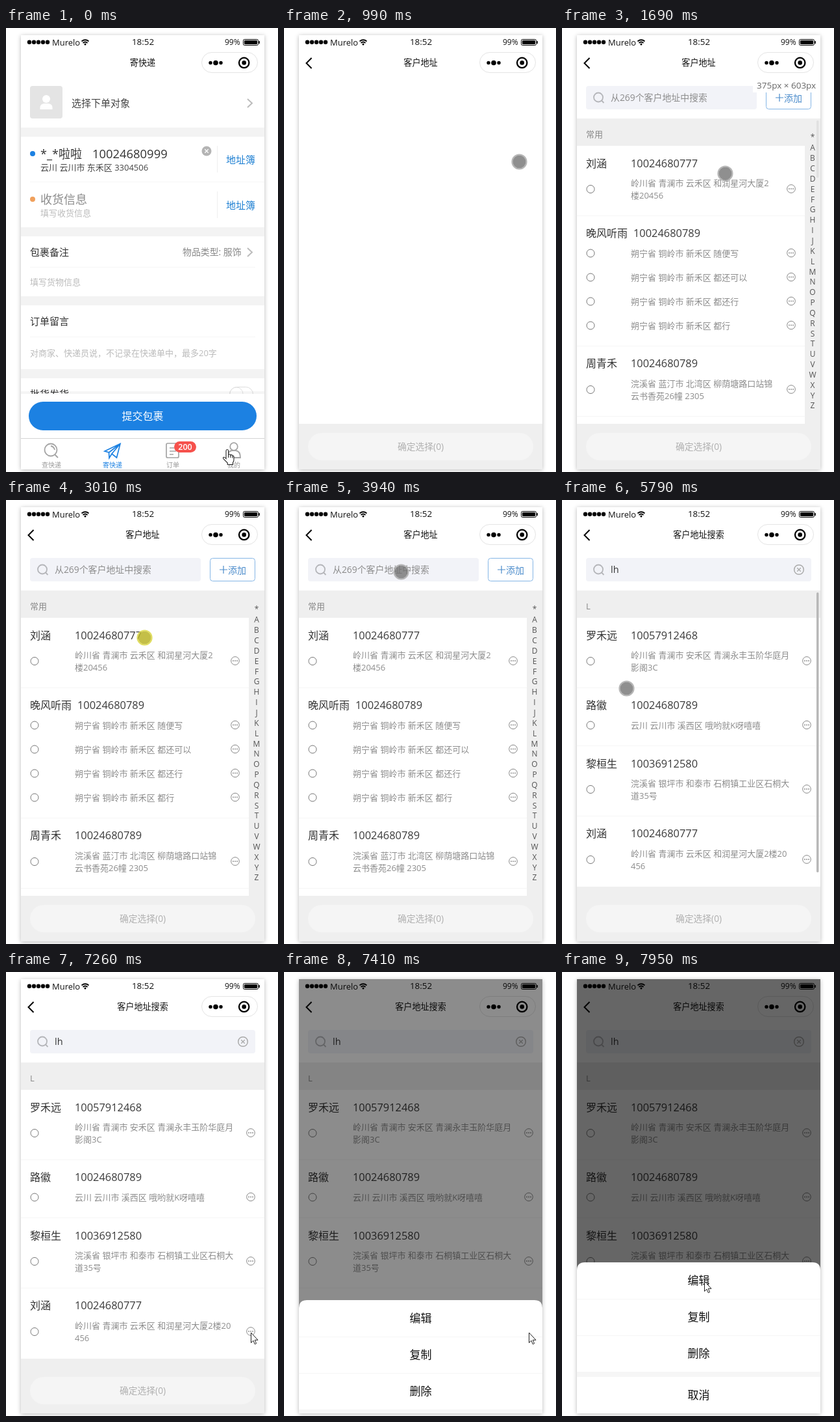
Recreate the animation shown at these times as an HTML page. Size 419 px wide and 682 px high, loop 8000 ms.

```html
<!DOCTYPE html>
<html lang="zh-CN">
<head>
<meta charset="utf-8">
<title>寄快递</title>
<style>
html, body { margin: 0; width: 100%; height: 100%; overflow: hidden; background: #fff; }
svg { display: block; width: 419px; height: 682px; }
text { font-family: "Open Sans", "Noto Sans CJK SC", "Noto Sans CJK", sans-serif; }
#phone { filter: drop-shadow(0 1px 3px rgba(0, 0, 0, .28)); }
</style>
</head>
<body>
<svg id="stage" viewBox="0 0 419 682" xmlns="http://www.w3.org/2000/svg"></svg>
<script>
const FPS = 13, LOOP = 8000;
const BLUE = '#1c81e2', GREY = '#999', PALE = '#bbb', INK = '#333';

// ---- drawing helpers ----
const text = (x, cy, size, fill, str, anchor = 'start', extra = '') =>
  `<text x="${x}" y="${(cy + size * .37).toFixed(2)}" font-size="${size}" fill="${fill}" text-anchor="${anchor}" ${extra}>${str}</text>`;
const mid = (cy, size, fill, str) => text(210.5, cy, size, fill, str, 'middle');
const rect = (x, y, w, h, fill, rx = 0, extra = '') =>
  `<rect x="${x}" y="${y}" width="${w}" height="${h}" rx="${rx}" fill="${fill}" ${extra}/>`;
const circle = (cx, cy, r, fill, extra = '') =>
  `<circle cx="${cx}" cy="${cy}" r="${r}" fill="${fill}" ${extra}/>`;
const line = (d, color, w = 1) =>
  `<path d="${d}" fill="none" stroke="${color}" stroke-width="${w}"/>`;
const group = (id, body) => `<g id="${id}">${body}</g>`;
const rule = (y, x1 = 37, x2 = 384) => rect(x1, y, x2 - x1, 1, '#f6f6f6');
const chevron = cy => line(`M372 ${cy - 6}l7 6.500l-7 6.500`, '#bcbcbc', 2);

// ---- shared parts ----
function statusBar() {
  const dots = [36, 43, 50, 57, 64].map(x => circle(x, 21.7, 3.2, '#000')).join('');
  const wifi = line('M116.500 20.500Q122 16 127.500 20.500M118.500 23Q122 20 125.500 23', '#000', 1.7) + circle(122, 25, 1.5, '#000');
  const battery = rect(365.5, 17.5, 23, 9, 'none', 2, 'stroke="#000"') + rect(367, 19, 20, 6, '#000', 1) + rect(389.5, 20, 1.5, 4, '#000');
  return dots + text(71, 22, 13, '#111', 'Murelo') + wifi +
    text(211, 21, 13.4, '#111', '18:52', 'middle') + text(337, 22, 12, '#111', '99%') + battery;
}

const capsule = rect(301.5, 37.5, 86, 31, '#fff', 15.5, 'stroke="#e4e4e4"') +
  circle(315, 53.5, 2.7, '#000') + circle(323, 53.5, 3.8, '#000') + circle(331, 53.5, 2.7, '#000') +
  circle(366.7, 53.4, 7.7, 'none', 'stroke="#000" stroke-width="2.3"') + circle(366.7, 53.4, 3.3, '#000');

const lens = circle(56, 106.5, 7, 'none', 'stroke="#b4b5b9" stroke-width="1.8"') + line('M61 111.500l3.500 3.500', '#b4b5b9', 1.8);
const cross = (x, y, r, color) => line(`M${x - r} ${y - r}l${2 * r} ${2 * r}m0 ${-2 * r}l${-2 * r} ${2 * r}`, color, 1.3);

function confirmBar(y, label) {
  return rect(23, y, 375, 678 - y, '#efefef') + rect(37, 622, 347, 42, '#f5f5f5', 21) + (label || '');
}
const confirmText = mid(643, 13.8, '#b0b0b0', '确定选择(0)');

const radio = y => circle(44, y, 6, '#fff', 'stroke="#777" stroke-width="1"');
const more = (x, y) => circle(x, y, 6.3, '#fff', 'stroke="#888" stroke-width="1"') +
  [-3, 0, 3].map(d => circle(x + d, y, .9, '#888')).join('');
const person = (y, name, phone, x = 106) => text(37, y, 16, INK, name) + text(x, y, 16.4, '#3a3a3a', phone);
const address = (y, moreX, ...lines) => {
  const c = y + (lines.length - 1) * 9.5;
  return lines.map((s, i) => text(106, y + i * 19, 13, '#8c8c8c', s)).join('') + radio(c) + more(moreX, c - .5);
};

// ---- pages ----
function homePage() {
  const bands = [153, 306, 412, 524].map(y => rect(23, y, 375, 14, '#f3f3f3')).join('');
  const avatar = rect(37, 89, 50, 50, '#e4e4e4', 4) + circle(62, 109, 6, '#fff') +
    '<path d="M52.500 125v-3q0-5 6-6h7q6 1 6 6v3z" fill="#fff"/>';
  const book = cy => rect(325, cy - 21, 1, 41, '#efefef') + text(339, cy, 15, '#1d7fd2', '地址簿');
  const sender = circle(41, 193, 4, BLUE) + text(53, 193, 18, INK, '*_*啦啦') + text(133, 193, 18.4, INK, '10024680999') +
    text(53, 214, 13, '#444', '云川 云川市 东禾区 3304506') +
    circle(309, 189, 7.5, '#b4b4b4') + cross(309, 189, 2.7, '#fff') + book(202);
  const receiver = circle(41, 263, 4, '#f0a05c') + text(53, 263, 18, '#8c8c8c', '收货信息') +
    text(53, 284, 13, PALE, '填写收货信息') + book(272);
  const notes = text(37, 344, 15, INK, '包裹备注') + text(272, 344, 13.9, '#888', '物品类型: 服饰') + chevron(344) + rule(367) +
    text(37, 390, 13, PALE, '填写货物信息') + text(37, 450, 15, INK, '订单留言') + rule(474) +
    text(37, 499, 13, PALE, '对商家、快递员说，不记录在快递单中，最多20字') +
    text(37, 562, 15, INK, '批货发货') + rect(344.5, 551.5, 36, 22, '#fff', 11, 'stroke="#ddd"') +
    circle(355, 562, 10, '#fff', 'stroke="#e2e2e2"');
  const submit = rect(23, 558, 375, 4, '#000', 0, 'opacity=".04"') + rect(23, 562, 375, 116, '#fff') +
    rect(35, 574, 351, 44, BLUE, 22) + mid(596, 16, '#fff', '提交包裹') + rect(23, 630, 375, 1, '#d4d4d4');
  const tab = (x, label, color) => text(x, 671, 10, color, label, 'middle');
  const tabs = circle(69, 648, 9.5, 'none', 'stroke="#a4a4a4" stroke-width="1.8"') + line('M75 655l5 5M69 642q5 1 6 6', '#a4a4a4', 1.8) +
    line('M152 650L176 638.500L170.500 660L163 654L159 660.500L158.500 652ZM163 654L176 638.500L158.500 652', BLUE, 1.7) +
    line('M266 648v10q0 2-2 2h-15q-2 0-2-2v-18q0-2 2-2h15M252 645h7M252 650h10M252 655h6', '#a4a4a4', 1.7) +
    circle(351, 643, 5.8, 'none', 'stroke="#a4a4a4" stroke-width="1.8"') +
    line('M341 660q0-10 7-11h6q7 1 7 11z', '#a4a4a4', 1.8) +
    rect(259, 635, 34, 17, '#f6514c', 8.5) + text(276, 643.5, 12.5, '#fff', '200', 'middle', 'font-weight="600"') +
    tab(70, '查快递', GREY) + tab(164, '寄快递', BLUE) + tab(257, '订单', GREY) + tab(351, '我的', GREY);
  return avatar + text(101, 115, 15, '#444', '选择下单对象') + chevron(115) + bands + sender + rule(236, 37, 398) +
    receiver + notes + submit + tabs;
}

function listPage() {
  const letters = [...'ABCDEFGHIJKLMNOPQRSTUVWXYZ'].map((c, i) => text(386, 184 + i * 15.84, 12, '#555', c, 'middle')).join('');
  const area = '朔宁省 铜岭市 新禾区 ';
  const many = ['随便写', '都还可以', '都还行', '都行'].map((s, i) => address(346 + i * 37, 353, area + s)).join('');
  return rect(37, 89, 263, 36, '#f2f3f8', 4, 'id="field"') + lens + text(75, 107, 13.9, '#8c8c8c', '从269个客户地址中搜索') +
    rect(314.5, 89.5, 69, 35, '#fff', 4, 'stroke="#85b6e6"') + line('M329 107h12M335 101v12', '#4a8bcb', 1.2) +
    text(342, 108, 14, '#4a8bcb', '添加') +
    rect(23, 139, 375, 469, '#efefef') + text(37, 163, 13, '#888', '常用') + rect(23, 181, 351, 427, '#fff') +
    person(208, '刘涵', '10024680777') + address(238, 353, '岭川省 青澜市 云禾区 和润星河大厦2', '楼20456') + rule(288, 23, 374) +
    person(315, '晚风听雨', '10024680789', 110) + many + rule(488, 23, 374) +
    person(515, '周青禾', '10024680789') + address(546, 353, '浣溪省 蓝汀市 北湾区 柳荫塘路口站锦', '云书香苑26幢 2305') + rule(596, 23, 374) +
    text(386, 168, 12, '#555', '*', 'middle') + letters;
}

const recent = text(41, 167, 12, '#8a8a8a', '最近搜索') + rect(41, 189, 37, 25, '#f4f4f4', 3) + text(59.5, 201, 11, INK, 'lh', 'middle');

function results() {
  return rect(23, 139, 375, 42, '#efefef') + text(37, 163, 13, '#888', 'L') +
    person(208, '罗禾远', '10057912468') + address(238, 377, '岭川省 青澜市 安禾区 青澜永丰玉阶华庭月', '影阁3C') + rule(288, 23, 398) +
    person(315, '路徽', '10024680789') + address(346, 377, '云川 云川市 溪西区 哦哟就K呀嘻嘻') + rule(377, 23, 398) +
    person(405, '黎桓生', '10036912580') + address(435, 377, '浣溪省 银坪市 和泰市 石桐镇工业区石桐大', '道35号') + rule(485, 23, 398) +
    person(512, '刘涵', '10024680777') + address(543, 377, '岭川省 青澜市 云禾区 和润星河大厦2楼20', '456') +
    confirmBar(594, confirmText);
}

const sheet = '<path d="M23 678V458q0-12 12-12H386q12 0 12 12V678z" fill="#fff"/>' +
  ['编辑', '复制', '删除'].map((s, i) => mid(474 + i * 56, 17, '#111', s)).join('') +
  rule(502, 23, 398) + rule(558, 23, 398) + rect(23, 614, 375, 8, '#f6f6f6') + mid(650, 17, '#111', '取消');

const hand = '<path d="M5.500 14V2.500q0-2 1.800-2t1.800 2V9q.4-1.300 1.700-1.200 1.400.1 1.500 1.500.5-.8 1.700-.7 1.300.2 1.400 1.600 2-.8 2.100 1.600v4.500q0 2.500-1.500 4.200v3H7.700v-2.500L1.600 14.800q-1.400-2 .4-2.600 1.500-.2 3.500 2.300zM9.100 9v4M12.300 9.500V13M15.400 10.500V13.500" fill="#fff" stroke="#222" stroke-width="1.100"/>';
const arrow = '<path d="M.5 1V16.500L4 13.200L6.300 18.700L8.600 17.700L6.300 12.300H11Z" fill="#fff" stroke="#222"/>';
const touch = circle(0, 0, 11, 'none', 'id="ring" stroke-width="2.2"') + circle(0, 0, 10, '#000', 'id="disc"');

const stage = document.getElementById('stage');
stage.innerHTML =
  '<defs><clipPath id="screen"><rect x="23" y="11" width="375" height="667"/></clipPath></defs>' +
  rect(23, 11, 375, 667, '#fff', 0, 'id="phone"') +
  '<g clip-path="url(#screen)">' +
  group('home', homePage()) +
  group('bar', confirmBar(608)) + group('barText', confirmText) +
  group('list', listPage()) +
  group('search', rect(37, 89, 347, 36, '#f2f3f8', 4) + lens) +
  group('hint', text(75, 107, 14, '#8c8c8c', '查找')) +
  group('query', text(75, 107, 14.5, INK, 'lh') + circle(365, 107, 7.3, 'none', 'stroke="#aaa" stroke-width="1.500"') + cross(365, 107, 2.8, '#aaa')) +
  group('recent', recent) + group('results', results()) +
  rect(392, 142, 3.5, 88, '#b8b8b8', 1.7, 'id="scroll"') +
  statusBar() + mid(53, 13.1, '#111', '').replace('<text', '<text id="title"') +
  group('back', line('M42.500 46L34.500 54L42.500 62', '#000', 2)) + capsule +
  group('size', rect(294, 79, 102, 20, '#fff') + text(300, 88, 13.5, '#666', '375px × 603px')) +
  rect(23, 11, 375, 667, '#000', 0, 'id="mask"') + group('sheet', sheet) + '</g>' +
  group('hand', hand) + group('arrow', arrow) + group('touch', touch);

const el = {};
stage.querySelectorAll('[id]').forEach(n => el[n.id] = n);

// ---- timeline, in steps of 1/13 s ----
const PATH = [
  [0, 341, 647], [1, 343, 640], [3, 352, 510], [5, 360, 320], [7, 362, 205], [15, 362, 205], [18, 330, 214],
  [22, 251, 223], [25, 115, 236], [28, 82, 233], [31, 56, 214], [33, 66, 213], [38, 213, 211], [41, 213, 211],
  [46, 180, 110], [54, 180, 110], [60, 131, 183], [65, 69, 209], [69, 69, 209], [71, 70, 193], [74, 70, 193],
  [75, 99, 289], [80, 240, 430], [85, 393, 551], [87, 378, 554], [92, 378, 554], [93, 377, 553], [96, 377, 553], [103, 219, 474]
];
const PRESSES = [[8, 9], [39, 42], [48, 50], [67, 69], [89, 90]];

const clamp = v => Math.max(0, Math.min(1, v));
const show = (name, on) => el[name].setAttribute('visibility', on ? 'visible' : 'hidden');

function pointer(s) {
  const i = Math.max(1, PATH.findIndex(p => p[0] >= s));
  const [a, x0, y0] = PATH[i - 1], [b, x1, y1] = PATH[i];
  const p = clamp((s - a) / (b - a));
  return [x0 + (x1 - x0) * p, y0 + (y1 - y0) * p];
}

function draw(ms) {
  const s = Math.min(103, Math.floor((ms + 11) * FPS / 1000));
  const found = s >= 70, typed = s >= 69;

  show('home', s < 9);
  show('back', s >= 9);
  show('bar', s >= 9 && s < 55);
  show('barText', s >= 13 && s < 55);
  show('list', s >= 15 && s < 55);
  show('search', s >= 55);
  show('hint', s >= 55 && !typed);
  show('query', typed);
  show('recent', s >= 55 && !found);
  show('results', found);
  show('size', s >= 16 && s < 25);
  el.field.setAttribute('fill', s === 50 ? '#dfe0e6' : '#f2f3f8');
  el.title.textContent = s < 9 ? '寄快递' : s < 13 ? '' : s < 53 ? '客户地址' : '客户地址搜索';

  const born = found ? 70 : 15;
  el.scroll.setAttribute('height', found ? 430 : 88);
  el.scroll.setAttribute('opacity', s < 15 ? 0 : clamp((born + 7.5 - s) / 2));

  const rise = 1 - Math.pow(1 - clamp((s - 94) / 4), 2);
  el.mask.setAttribute('opacity', .6 * rise);
  el.sheet.setAttribute('transform', `translate(0 ${232 * (1 - rise)})`);

  const [x, y] = pointer(s);
  const pressed = PRESSES.some(([a, b]) => s >= a && s < b);
  show('hand', s < 2);
  show('arrow', s >= 93);
  show('touch', s >= 2 && s < 93);
  el.hand.setAttribute('transform', `translate(${x - 7.5} ${y})`);
  el.arrow.setAttribute('transform', `translate(${x} ${y})`);
  el.touch.setAttribute('transform', `translate(${x + .5} ${y + .5})`);
  el.disc.setAttribute('fill', pressed ? 'rgba(186,180,40,.85)' : 'rgba(115,115,115,.8)');
  el.ring.setAttribute('stroke', pressed ? 'rgba(222,218,80,.9)' : 'rgba(175,175,175,.9)');
}

const start = performance.now();
function tick(now) {
  draw(Math.max(0, now - start) % LOOP);
  requestAnimationFrame(tick);
}
draw(0);
requestAnimationFrame(tick);
</script>
</body>
</html>
```
